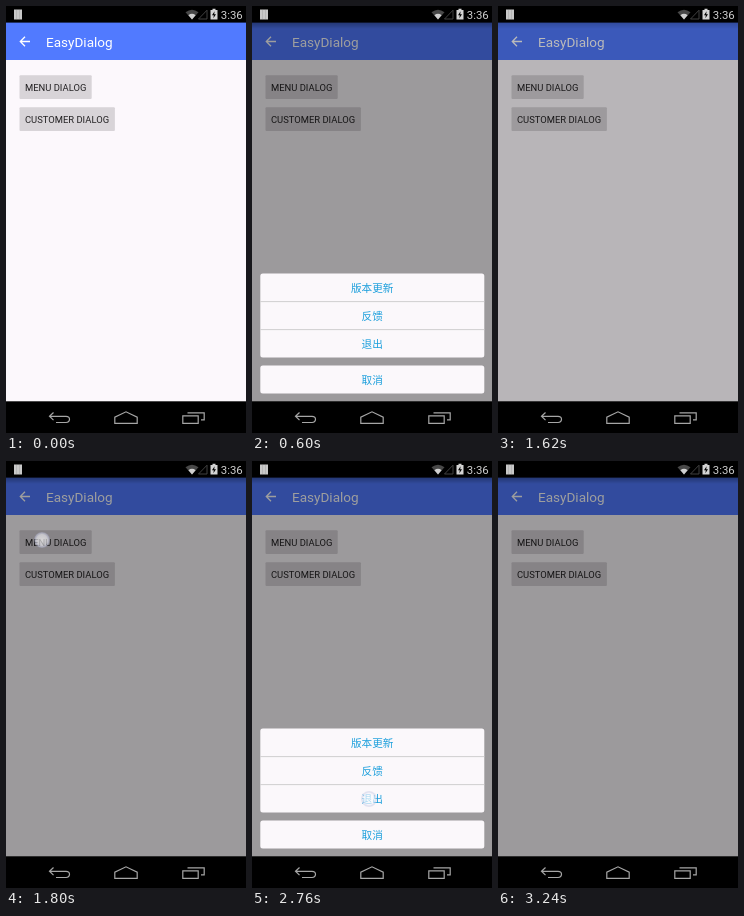
Animation of 240x427 px, one loop 3.3 s. Source, as an HTML page:

```html
<!DOCTYPE html>
<html lang="zh">
<head>
<meta charset="utf-8">
<title>EasyDialog</title>
<style>
html, body { margin: 0; width: 100%; height: 100%; overflow: hidden; background: #000; }
svg { display: block; width: 100%; height: 100%; }
text { font-family: Roboto, "Noto Sans CJK SC", "Noto Sans CJK", sans-serif; }
.title { font-size: 13.55px; fill: #fff; }
.label { font-size: 9.42px; fill: #222022; }
.clock { font-size: 11.4px; fill: #cfcfcf; }
.item { font-size: 10.67px; fill: #1c9fdc; text-anchor: middle; }
.line { fill: none; stroke: #a6a6a6; stroke-width: 1.2; }
.btn { fill: #d8d4d8; }

.shade, .sheet, .dot { animation: 3.3s linear infinite; }
.shade { animation-name: shade; }
.sheet { animation-name: sheet; }
.dot { animation-name: dot; }

@keyframes shade {
  0%, 2.4%, 50.4%, 51.8% { opacity: 0; }
  5.2%, 48.6%, 54.4%, 100% { opacity: 1; }
}
/* Quadratic: decelerating in, accelerating out */
@keyframes sheet {
  0%, 7.64%, 48.67%, 55% {
    transform: translateY(129px);
    animation-timing-function: cubic-bezier(.333, .667, .667, 1);
  }
  17.94%, 37.15%, 65.3%, 85.33% {
    transform: none;
    animation-timing-function: cubic-bezier(.333, 0, .667, .333);
  }
  96.85%, 100% { transform: translateY(129px); }
}
@keyframes dot {
  0%, 1.2% { transform: translate(40px, 81px); opacity: 0; }
  1.8%, 6.1% { transform: translate(40px, 81px); opacity: 1; }
  12.7% { transform: translate(40px, 81px); opacity: 0; }
  28.6% { transform: translate(111px, 375px); opacity: 0; }
  29.1%, 38% { transform: translate(111px, 375px); opacity: .95; }
  41.8% { transform: translate(111px, 375px); opacity: .65; }
  44.8% { transform: translate(111px, 375px); opacity: 0; }
  50.3% { transform: translate(36px, 79px); opacity: 0; }
  50.9%, 53.5% { transform: translate(36px, 79px); opacity: 1; }
  54.5% { transform: translate(36px, 79px); opacity: .85; }
  64.5% { transform: translate(36px, 79px); opacity: 0; }
  77.7% { transform: translate(117px, 338px); opacity: 0; }
  78.2%, 83.6% { transform: translate(117px, 338px); opacity: .9; }
  91%, 100% { transform: translate(117px, 338px); opacity: 0; }
}
</style>
</head>
<body>
<svg viewBox="0 0 240 427" preserveAspectRatio="none">
  <defs>
    <radialGradient id="glow">
      <stop offset="0" stop-color="#fff" stop-opacity=".78"/>
      <stop offset=".68" stop-color="#f6f6fc" stop-opacity=".7"/>
      <stop offset=".88" stop-color="#c8cce6" stop-opacity=".6"/>
      <stop offset="1" stop-color="#b8bcdc" stop-opacity=".3"/>
    </radialGradient>
    <linearGradient id="scrim" x2="0" y2="1">
      <stop offset="0" stop-opacity=".3"/>
      <stop offset="1" stop-opacity="0"/>
    </linearGradient>
  </defs>

  <rect width="240" height="427" fill="#fcf8fc"/>
  <rect y="16" width="240" height="38" fill="#517aff"/>
  <path d="M24 35.5H14.6M19 30.8l-4.7 4.7L19 40.2" fill="none" stroke="#fff" stroke-width="1.3"/>
  <text class="title" x="40" y="40.5">EasyDialog</text>

  <rect class="btn" x="13.5" y="69.2" width="72.2" height="23.8" rx="1"/>
  <text class="label" x="19" y="84.6">MENU DIALOG</text>
  <rect class="btn" x="13.5" y="101.2" width="95.4" height="23.8" rx="1"/>
  <text class="label" x="19" y="116.6">CUSTOMER DIALOG</text>

  <g class="shade">
    <rect y="16" width="240" height="380" opacity=".38"/>
    <rect y="16" width="240" height="7" fill="url(#scrim)"/>
  </g>

  <g class="sheet">
    <rect x="8.3" y="267.4" width="224" height="84" rx="2.5" fill="#fbf8fb"/>
    <path d="M8.3 295.6H232.3M8.3 323.6H232.3" stroke="#cccacc" stroke-width=".9"/>
    <rect x="8.3" y="359.4" width="224" height="28" rx="2.5" fill="#fbf8fb"/>
    <text class="item" x="120.2" y="286">版本更新</text>
    <text class="item" x="120.2" y="314">反馈</text>
    <text class="item" x="120.2" y="342">退出</text>
    <text class="item" x="120.2" y="377.6">取消</text>
  </g>
  <circle class="dot" r="8" fill="url(#glow)"/>

  <!-- Status bar -->
  <rect width="240" height="16.6"/>
  <rect x="8" y="3.5" width="8" height="10" fill="#c8c8c8"/>
  <path d="M10.5 4v9M13.5 4v9" stroke="#aaa" stroke-width=".6"/>
  <path d="M179.5 6.2Q186 1.2 192.5 6.2L186 13.5Z" fill="#484848"/>
  <path d="M182.4 9.2Q186 6.4 189.6 9.2L186 13.5Z" fill="#d0d0d0"/>
  <path d="M192.5 13L201 4.2V13Z" fill="none" stroke="#484848" stroke-width=".9"/>
  <path d="M204.5 4H206.5V2.8H209.5V4H211.5V13.5H204.5Z" fill="#d4d4d4"/>
  <path d="M208.6 5.2L206 9.3H207.8L207.4 12.3L210 8.2H208.2Z"/>
  <text class="clock" x="214.8" y="13">3:36</text>

  <!-- Navigation bar -->
  <rect y="395.3" width="240" height="32"/>
  <path class="line" d="M47.5 406.5L43.5 410.3L47.5 414.1M44 410.3H60Q63.5 410.3 63.5 413.3T60 416.5H50"/>
  <path class="line" d="M108.8 417.3V411.2L120 405.8L131.2 411.2V417.3Z"/>
  <path class="line" d="M176.8 409.8H192.2V417.3H176.8ZM181.5 406.8H198.2V413.8H195"/>
</svg>
</body>
</html>
```
